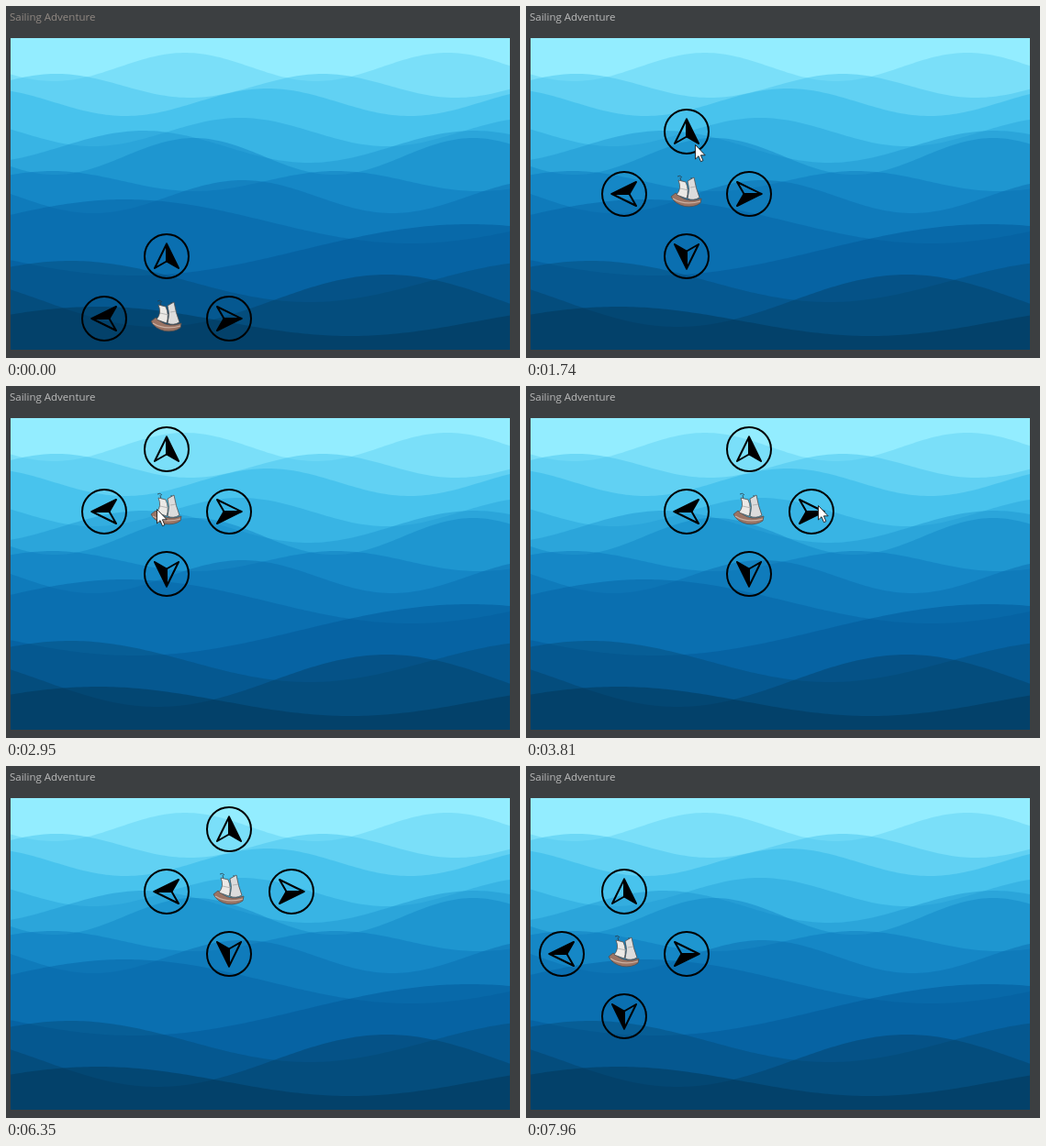
Write an HTML page that moves like this. It is 560 px wide and 384 px high and loops after 8000 ms.

```html
<!DOCTYPE html>
<html lang="en">
<head>
<meta charset="utf-8">
<title>Sailing Adventure</title>
<style>
  html, body { margin: 0; width: 100%; height: 100%; overflow: hidden; background: #3c3f41; }
  svg { display: block; width: 560px; height: 384px; }
  #title { font: 11.5px "Open Sans", "Noto Sans", sans-serif; }
</style>
</head>
<body>
<svg viewBox="0 0 560 384">
  <defs>
    <clipPath id="frame"><rect x="5" y="35" width="544" height="340"/></clipPath>
    <g id="arrow" stroke="#000" stroke-width="2" stroke-linejoin="round">
      <circle r="24" fill="none"/>
      <path d="M0 -13.500 L-13 13 L0 5.500 Z" fill="none"/>
      <path d="M0 -13.500 L13 13 L0 5.500 Z"/>
    </g>
  </defs>
  <text id="title" x="4" y="16">Sailing Adventure</text>
  <g id="sea" clip-path="url(#frame)"><rect x="5" y="35" width="544" height="340" fill="#93edff"/></g>

  <g id="pad">
    <g stroke="#55504e" stroke-width=".8" stroke-linejoin="round">
      <path d="M-10 -19 q3 -2 5 1 M-7 -18 L-2 4 M5 -18 L8 4" fill="none" stroke="#2b3a44"/>
      <path d="M-17 3 L-12 -1 L-7 3 Q3 10 16 5 L15 10 Q8 15 -2 13.500 Q-13 11 -17 3 Z" fill="#9a7464"/>
      <path d="M-15 5 Q-2 13 15 8" fill="none" stroke="#cbb0a2" stroke-width="1.3"/>
      <path d="M1 -14 L8 -18 Q10 -6 14 4 Q7 8 1 5 Q4 -5 1 -14 Z" fill="#dcdcdc"/>
      <path d="M-9 -15 L-1 -13 Q3 -4 0 5 L-11 1 Q-5 -6 -9 -15 Z" fill="#ebe9e6"/>
      <path d="M-7 -6 L2 -4 M4 -7 L10 -8" fill="none" stroke="#a9a9a9"/>
    </g>
  </g>

  <g id="mouse">
    <path d="M.5 .5 V16 L4 12.700 L6.500 18.700 L8.900 17.600 L6.400 11.800 H11.200 Z" fill="#fff" stroke="#1c1c1c" stroke-width=".9"/>
    <circle id="halo" r="12" fill="#ff0" opacity=".5"/>
  </g>
</svg>
<script>
const $ = id => document.getElementById(id);
const LOOP = 8000, CELL = 68, COLS = 8, ROWS = 5, TICK = 67, PRESS = 70;

function add(parent, tag, attrs) {
  const el = document.createElementNS("http://www.w3.org/2000/svg", tag);
  for (const k in attrs) el.setAttribute(k, attrs[k]);
  parent.append(el);
}

// Each wave is a cosine through one crest and one trough: x, y, x, y.
const waves = [
  [195, 51, 338, 82], [345, 74, 200, 100], [285, 90, 440, 120], [255, 122, 415, 153],
  [150, 136, 330, 171], [205, 144, 357, 184], [50, 180, 205, 202], [258, 190, 421, 226],
  [130, 211, 440, 259], [505, 238, 140, 294], [70, 278, 330, 323], [415, 293, 165, 350],
  [100, 328, 375, 360]
];
const shades = [[147, 237, 255], [67, 192, 236], [25, 143, 205], [7, 104, 169], [4, 66, 108]];

function depth(n) {
  const p = n / waves.length * (shades.length - 1);
  const i = Math.min(Math.floor(p), shades.length - 2);
  return shades[i].map((c, k) => c + (shades[i + 1][k] - c) * (p - i));
}

// Half-transparent layers whose pile-up follows the depth gradient.
waves.forEach(([cx, cy, tx, ty], n) => {
  let d = "M5 375";
  for (let x = 5; x <= 549; x += 4) {
    const y = (cy + ty) / 2 - (ty - cy) / 2 * Math.cos(Math.PI * (x - cx) / (tx - cx));
    d += `L${x} ${y.toFixed(2)}`;
  }
  const above = depth(n);
  const fill = depth(n + 1).map((c, k) => Math.max(0, 2 * c - above[k]));
  add($("sea"), "path", { d: d + "V375Z", fill: `rgb(${fill})`, "fill-opacity": 0.5 });
});

const dirs = { U: [0, -1], R: [1, 0], D: [0, 1], L: [-1, 0] };
Object.values(dirs).forEach(([dx, dy], i) => add($("pad"), "use", {
  href: "#arrow",
  transform: `translate(${dx * CELL} ${dy * CELL}) rotate(${i * 90})`
}));
const arrows = [...$("pad").querySelectorAll("use")];

// The mouse reaches x, y and rests there before pressing.
const enter = { at: 190, x: 331, y: 346 };
const clicks = [
  { at: 930, dir: "U", x: 181, y: 271, rest: 540 },
  { at: 1400, dir: "U", x: 184, y: 213, rest: 140 },
  { at: 1930, dir: "U", x: 184, y: 151, rest: 190 },
  { at: 2200, dir: "U", x: 180, y: 83, rest: 0 },
  { at: 2880, dir: "D", x: 164, y: 134, rest: 140 },
  { at: 3350, dir: "R", x: 240, y: 132, rest: 0 },
  { at: 3960, dir: "R", x: 318, y: 130, rest: 150 },
  { at: 4420, dir: "D", x: 312, y: 207, rest: 140 },
  { at: 5090, dir: "L", x: 243, y: 209, rest: 0 }
];
const leave = { at: 5360, x: 420, y: 266, rest: 60 };
const keys = { 6350: "U", 6480: "L", 7010: "D", 7150: "R", 7420: "U", 7620: "L", 7680: "L", 7960: "D" };
const steps = [
  ...clicks.map(c => [c.at + PRESS, c.dir]),
  ...Object.entries(keys)
];

function shipAt(t) {
  let col = 2, row = 4;
  for (const [at, dir] of steps) {
    if (t < at) break;
    col += dirs[dir][0];
    row += dirs[dir][1];
  }
  return [col, row];
}

function mouseAt(t) {
  let { at: start, x, y } = enter;
  for (const stop of [...clicks, leave]) {
    if (t < start) break;
    const end = stop.at - stop.rest;
    const p = t >= end ? 1 : Math.floor((t - start) / TICK) * TICK / (end - start);
    const ease = p * p * (3 - 2 * p);
    x += (stop.x - x) * ease;
    y += (stop.y - y) * ease;
    start = stop.at + PRESS;
  }
  return [x, y];
}

const show = (el, on) => el.setAttribute("visibility", on ? "visible" : "hidden");
const move = (el, x, y) => el.setAttribute("transform", `translate(${x} ${y})`);

function draw(t) {
  const [col, row] = shipAt(t);
  move($("pad"), 39 + col * CELL, 69 + row * CELL);
  Object.values(dirs).forEach(([dx, dy], i) => {
    const c = col + dx, r = row + dy;
    show(arrows[i], c >= 0 && c < COLS && r >= 0 && r < ROWS);
  });

  const [x, y] = mouseAt(t);
  move($("mouse"), Math.round(x), Math.round(y));
  show($("mouse"), t >= enter.at && t < leave.at);
  show($("halo"), clicks.some(c => t >= c.at && t < c.at + PRESS));
  $("title").setAttribute("fill", t < clicks[0].at ? "#918983" : "#bbbbbb");
}

const begin = performance.now();
function tick() {
  draw((performance.now() - begin) % LOOP);
  requestAnimationFrame(tick);
}
tick();
</script>
</body>
</html>
```
